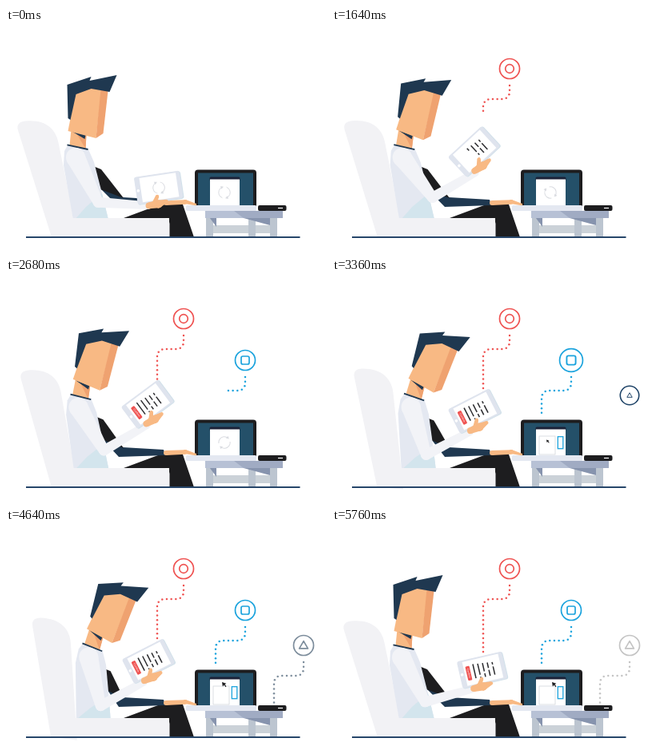
An HTML page with a canvas for the animation above (5.8 s loop, 400 by 278 pixels).

```html
<!DOCTYPE html>
<html lang="en">
<head>
<meta charset="utf-8">
<title>Working from the armchair</title>
<style>
html, body { margin: 0; width: 100%; height: 100%; overflow: hidden; background: #fff; }
canvas { display: block; width: 400px; height: 278px; }
</style>
</head>
<body>
<canvas id="stage"></canvas>
<script>
const LOOP = 5800, STEP = 40;
const canvas = document.getElementById('stage');
const ctx = canvas.getContext('2d');
const ratio = window.devicePixelRatio || 1;
canvas.width = 400 * ratio;
canvas.height = 278 * ratio;

const NAVY = '#1f3850', BLACK = '#1d1d1f', SKIN = '#f8b984', SHADE = '#efa270';
const RED = '#ef5352', BLUE = '#1ba3dd', SHIRT = '#e4e8f1', PALE = '#d3e5ed';
const SLEEVE = '#f2f3f7', CHAIR = '#f2f2f5', GREY = '#dadce1';
const RAD = Math.PI / 180;

// ---------- helpers ----------
const clamp = x => Math.max(0, Math.min(1, x));
const mix = (a, b, p) => a + (b - a) * p;
const span = (t, a, b) => clamp((t - a) / (b - a));
const rise = (t, a, b) => { const p = span(t, a, b); return p * p * (3 - 2 * p); };

function poly(fill, ...p) {
  ctx.beginPath();
  for (let i = 0; i < p.length; i += 2) ctx.lineTo(p[i], p[i + 1]);
  ctx.fillStyle = fill;
  ctx.fill();
}

function box(fill, x, y, w, h, r = 0) {
  ctx.beginPath();
  ctx.roundRect(x, y, w, h, r);
  ctx.fillStyle = fill;
  ctx.fill();
}

function line(color, width, x0, y0, x1, y1) {
  ctx.beginPath();
  ctx.moveTo(x0, y0);
  ctx.lineTo(x1, y1);
  ctx.strokeStyle = color;
  ctx.lineWidth = width;
  ctx.stroke();
}

function disc(fill, x, y, r) {
  ctx.beginPath();
  ctx.arc(x, y, r, 0, 7);
  ctx.fillStyle = fill;
  ctx.fill();
}

function turned(x, y, deg, draw) {
  ctx.save();
  ctx.translate(x, y);
  ctx.rotate(deg * RAD);
  ctx.translate(-x, -y);
  draw();
  ctx.restore();
}

function spin(x, y, cx, cy, deg) {
  const c = Math.cos(deg * RAD), s = Math.sin(deg * RAD);
  return [cx + (x - cx) * c - (y - cy) * s, cy + (x - cx) * s + (y - cy) * c];
}

// tapered capsule
function limb(fill, [x0, y0], [x1, y1], r0, r1) {
  const a = Math.atan2(y1 - y0, x1 - x0), nx = -Math.sin(a), ny = Math.cos(a);
  poly(fill, x0 + nx * r0, y0 + ny * r0, x1 + nx * r1, y1 + ny * r1,
    x1 - nx * r1, y1 - ny * r1, x0 - nx * r0, y0 - ny * r0);
  disc(fill, x0, y0, r0);
  disc(fill, x1, y1, r1);
}

// joint between two bones
function elbow([x0, y0], [x1, y1], l0, l1) {
  const dx = x1 - x0, dy = y1 - y0, d = Math.hypot(dx, dy);
  const a = (l0 * l0 - l1 * l1 + d * d) / (2 * d);
  const h = Math.sqrt(Math.max(0, l0 * l0 - a * a));
  return [x0 + (dx * a - dy * h) / d, y0 + (dy * a + dx * h) / d];
}

// ---------- motion ----------
const nod = t => rise(t, 120, 880) - rise(t, 1280, 1960);
const headTilt = t => 15.2 * (nod(t) + rise(t, 2240, 3080) - rise(t, 4880, 5640));
const bodyLean = t => .1 * nod(t) + rise(t, 2100, 4050) - rise(t, 4760, 5680);

function tabletPose(t) {
  const lift = rise(t, 420, 2000), settle = rise(t, 2040, 3260), lower = rise(t, 4880, 5760);
  return {
    x: 191 - 15 * lift + 2.5 * settle + 9.5 * lower,
    y: 200 - 52 * lift + 19 * settle + 11 * lower,
    deg: -8.5 - 39.5 * lift + 21 * settle + 14 * lower
  };
}

// ---------- scenery ----------
function spinner(x, y, r, deg) {
  for (const side of [0, 180]) turned(x, y, deg + side, () => {
    ctx.beginPath();
    ctx.arc(x, y, r, -1.2, 1.2);
    ctx.strokeStyle = GREY;
    ctx.lineWidth = 1;
    ctx.stroke();
    turned(x, y, 70, () => poly(GREY, x + r - 2, y - 2, x + r + 2, y - 2, x + r, y + 1.5));
  });
}

function chairBack(lean) {
  turned(62, 255, lean * 8, () => {
    ctx.beginPath();
    ctx.moveTo(57, 262);
    ctx.lineTo(15, 128);
    ctx.quadraticCurveTo(12, 118, 24, 116.5);
    ctx.bezierCurveTo(48, 114, 63, 125, 66, 146);
    ctx.lineTo(90, 262);
    ctx.fillStyle = CHAIR;
    ctx.fill();
  });
}

function table() {
  box('#cbd2d8', 256, 247, 80, 10);
  for (const x of [250, 303, 330]) box('#bcc5d0', x, 237, 9, 25);
  poly('#8794ae', 249, 230, 263, 238, 263, 249);
  poly('#8794ae', 297, 238, 330, 238, 330, 247);
  box('#b7c1d5', 249, 229, 97, 9);
  poly('#a0abc3', 285, 229, 346, 229, 346, 238, 297, 238);
}

function laptop(t) {
  box(BLACK, 236, 177.5, 77, 48, 4);
  box('#245069', 240, 181.5, 69, 43);
  box('#1b2238', 254.5, 186.5, 38, 5, 1.5);
  box('#fff', 255, 189.5, 37, 35);
  const doc = rise(t, 2920, 3240);
  ctx.save();
  ctx.globalAlpha = 1 - doc;
  spinner(273, 206, 7.2, t * .09);
  ctx.globalAlpha = doc;
  ctx.lineWidth = .8;
  ctx.strokeStyle = '#d3d6dc';
  ctx.strokeRect(259, 198, 20, 23);
  ctx.lineWidth = 1.3;
  ctx.strokeStyle = BLUE;
  ctx.strokeRect(282.3, 198.7, 6.5, 15);
  const move = rise(t, 3360, 4640);
  ctx.translate(268 + 2 * move + 5 * rise(t, 4640, 4860), 202.5 - 9.5 * move);
  ctx.scale(.6 + .3 * move, .6 + .3 * move);
  poly(BLACK, 0, 0, 6, 2, 4, 3, 6, 6, 5, 7, 3, 4, 1, 6);
  ctx.restore();
  box(SHIRT, 225, 222, 88, 7, 1.5);
  box(BLACK, 315, 222, 35.5, 7, 2);
  line('#fff', 1.2, 340, 225.5, 346, 225.5);
}

// ---------- callouts ----------
const CALLOUTS = [
  { x: 222, y: 51, width: 33, drop: 109, sides: 0 },
  { x: 299, y: 103, width: 37, drop: 70, sides: 4 },
  { x: 372, y: 147, width: 37, drop: 72, sides: 3 }
];

// dotted route: down, left and down again with rounded corners
function route({ x, y, width, drop }, shown, color) {
  const r = 9, gap = 5.7, bend = y + 38, left = x - width;
  const arc = r * Math.PI / 2, lead = 38 - r - 20, run = width - 2 * r;
  const total = lead + 2 * arc + run + drop - 38 - r;
  const place = d => {
    if (d < lead) return [x, y + 20 + d];
    if ((d -= lead) < arc) return [x - r + r * Math.cos(d / r), bend - r + r * Math.sin(d / r)];
    if ((d -= arc) < run) return [x - r - d, bend];
    if ((d -= run) < arc) return [left + r - r * Math.sin(d / r), bend + r - r * Math.cos(d / r)];
    return [left, bend + r + d - arc];
  };
  for (let d = 1; d < total * shown; d += gap) disc(color, ...place(d), 1.25);
}

function badge(sides) {
  ctx.beginPath();
  if (sides === 0) ctx.arc(0, 0, 5.3, 0, 7);
  if (sides === 4) ctx.roundRect(-5, -5, 10, 10, 2);
  if (sides === 3) for (let i = 0; i < 3; i++) {
    const a = (i * 120 - 90) * RAD;
    ctx.lineTo(6.2 * Math.cos(a), .8 + 6.2 * Math.sin(a));
  }
  ctx.closePath();
  ctx.stroke();
}

function callout(c, color, dt) {
  if (dt < 0) return;
  const grow = 1 - (1 - span(dt, 0, 360)) ** 2;
  const beat = c.sides === 3 ? 0 : Math.sin(Math.PI * span(dt, 1020, 1660)) ** 2;
  const size = grow + beat * .16, inner = rise(dt, 100, 400) * (1 + beat * .12);
  route(c, span(dt, 360, 1060), color);
  ctx.save();
  ctx.translate(c.x, c.y);
  ctx.strokeStyle = color;
  ctx.lineJoin = 'round';
  ctx.lineWidth = Math.max(.8, 1.7 * grow);
  ctx.beginPath();
  ctx.arc(0, 0, 12.5 * size, 0, 7);
  ctx.stroke();
  ctx.scale(inner, inner);
  if (inner) badge(c.sides);
  ctx.restore();
}

function callouts(t) {
  const p = span(t, 4340, 4860);
  const fading = `rgb(${mix(29, 196, p)},${mix(66, 196, p)},${mix(102, 196, p)})`;
  const colors = [RED, BLUE, fading];
  CALLOUTS.forEach((c, i) => callout(c, colors[i], t - 890 - 1100 * i));
}

// ---------- person ----------
const onBody = (x, y, deg) => spin(x, y, 98, 262, deg);

function legs() {
  poly(BLACK, 147, 238, 198, 219, 220, 218, 235, 262, 204, 262, 204, 238);
}

function farArm(deg) {
  const [x, y] = onBody(110, 171, deg * .8);
  poly(NAVY, x, y + 22, 146, 212, 197, 215, 199, 222, 141, 224);
  poly(BLACK, x - 6, y, x + 9, y + 6, 147, 213, x, y + 28);
  limb(SKIN, [200, 219], [224, 218], 3, 2.8);
  limb(SKIN, [224, 217.5], [237, 221], 2.5, 1.2);
}

function torso(deg) {
  turned(98, 262, deg, () => {
    poly(SHIRT, 77, 147, 103, 152, 110, 168, 119, 203, 128, 240, 84, 240, 72, 172, 73, 154);
    poly(PALE, 120, 207, 128, 240, 86, 240, 100, 224);
  });
}

function head(deg, tilt) {
  const [px, py] = onBody(94, 143, deg);
  ctx.save();
  ctx.translate(px - 94.5, py - 143);
  turned(94, 143, (tilt + deg) / 2, () => {
    poly(SKIN, 82, 127, 101, 134, 100, 151, 80, 147);
    poly(SHADE, 89, 133, 101, 134, 100, 151);
    poly(NAVY, 82, 129, 100, 134, 99, 139);
  });
  turned(94, 143, deg, () => line(NAVY, 1.8, 77, 146.3, 103, 152));
  turned(94, 143, tilt, () => {
    poly(SKIN, 87, 82, 107, 74, 120, 78, 113, 138, 78, 129);
    poly(SHADE, 119, 77, 128, 79, 122, 132, 113, 138);
    poly(NAVY, 77, 71, 107, 61, 105, 66, 139, 59, 130, 80, 107, 76, 88, 83, 81, 115, 78, 113);
  });
  ctx.restore();
}

// lines of writing, each broken a little earlier than the last
function writing(page) {
  for (let i = 0; i < 5; i++) {
    const x = -10 + 6 * i, top = -10 + .7 * i, split = 8 - 3 * i;
    const end = mix(top, 9, rise(page, .6 - .15 * i, .9 - .15 * i));
    line('#2b2b2e', 1.5, x, top, x, Math.min(split, end));
    if (end > split + 2.5) line('#2b2b2e', 1.5, x, split + 2.5, x, end);
  }
}

function button(size) {
  ctx.translate(-17.5, 0);
  ctx.scale(size, size);
  box(RED, -2.6, -9, 5.2, 18, 1.2);
  ctx.rotate(Math.PI / 2);
  ctx.fillStyle = '#fff';
  ctx.font = '3.4px Lato, sans-serif';
  ctx.textAlign = 'center';
  ctx.textBaseline = 'middle';
  ctx.fillText('Confirm', 0, 0);
}

function tablet({ x, y, deg }, t) {
  const page = span(t, 1360, 1880);
  ctx.save();
  ctx.translate(x, y);
  ctx.rotate(deg * RAD);
  box('#d2e1ea', -28.5, -17, 58, 35, 3);
  box('#dfe4ee', -29, -17.5, 57.5, 34.5, 3);
  box('#fff', -22.5, -15.5, 46, 30.5);
  disc('#fff', -26, 0, 1.8);
  ctx.globalAlpha = 1 - span(t, 1320, 1480);
  spinner(0, 0, 7.3, t * .09);
  ctx.globalAlpha = 1;
  if (page > 0) {
    writing(page);
    button(rise(page, .65, 1));
  }
  ctx.restore();
}

function nearHand({ x, y, deg }) {
  ctx.save();
  ctx.translate(...spin(x - 4, y + 17, x, y, deg));
  ctx.rotate((deg + 8.5) * .65 * RAD);
  limb(SKIN, [-11, 5], [1, 3], 4, 5);
  limb(SKIN, [1, 3], [11, -.5], 5, 2.2);
  limb(SKIN, [-4, 2], [-.5, -6.5], 3, 2.2);
  ctx.restore();
}

function nearArm(bodyDeg, { x, y, deg }) {
  const shoulder = onBody(87, 162, bodyDeg);
  const wrist = spin(x - 17, y + 20, x, y, deg);
  const joint = elbow(shoulder, wrist, 63, 62);
  limb(SLEEVE, shoulder, joint, 12, 6.5);
  limb(SLEEVE, joint, wrist, 6.5, 4.8);
}

function draw(t) {
  const lean = bodyLean(t), deg = lean * 9.3, pose = tabletPose(t);
  ctx.setTransform(ratio, 0, 0, ratio, 0, 0);
  ctx.clearRect(0, 0, 400, 278);
  chairBack(lean);
  table();
  laptop(t);
  callouts(t);
  legs();
  farArm(deg);
  torso(deg);
  box(CHAIR, 66, 238, 138.5, 24, [0, 7, 0, 0]);
  line('#27466a', 1.8, 25, 262, 367.5, 262);
  head(deg, headTilt(t));
  nearArm(deg, pose);
  tablet(pose, t);
  nearHand(pose);
}

const begin = performance.now();
function tick() {
  const t = Math.floor(((performance.now() - begin) % LOOP) / STEP) * STEP;
  draw(t < 120 ? 0 : t);
  requestAnimationFrame(tick);
}
tick();
</script>
</body>
</html>
```
